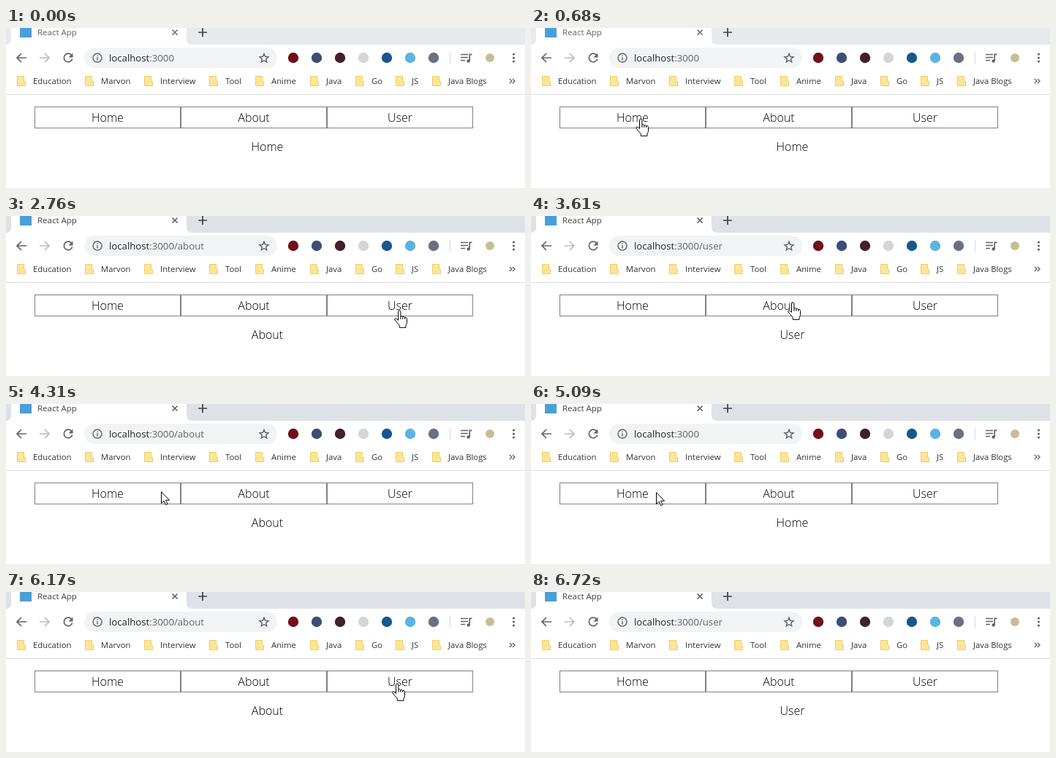
Write an HTML page that moves like this. It is 710 by 220 pixels and loops after 7.04 s.

```html
<!DOCTYPE html>
<html lang="en">
<head>
<meta charset="utf-8">
<title>Router demo</title>
<style>
  html, body { margin: 0; width: 100%; height: 100%; overflow: hidden; background: #fff; }
  svg { display: block; width: 710px; height: 220px; font-family: "Open Sans", "Noto Sans", sans-serif; }
  .strip { fill: #dee1e6; }
  .title { font-size: 11.5px; fill: #3c4043; }
  .close { stroke: #3c4043; }
  .blurred .strip { fill: #e7eaed; }
  .blurred .title { fill: #5f6368; }
  .blurred .close { stroke: #6b6f74; }
  .bookmark { font-size: 11.3px; fill: #2f3336; }
  .folder { fill: #ffe694; stroke: #eccb6b; }
  .url { font-size: 13.2px; fill: #202124; }
  .dim { fill: #5f6368; }
  .icon { fill: none; stroke: #5f6368; stroke-width: 1.7; }
  .thin { stroke-width: 1.4; }
  .dark { stroke: #3c4043; }
  .pale { stroke: #babcbe; }
  .page { font-size: 16px; font-weight: 300; fill: #000; }
  .cell { fill: none; stroke: #808080; }
  .cursor { fill: #fff; stroke: #000; stroke-linejoin: round; }
</style>
</head>
<body>
<svg id="stage" viewBox="0 0 710 220">
  <rect width="710" height="220" fill="#fff"/>

  <!-- tab strip -->
  <path class="strip" d="M0 0H7V15Q7 23 0 23ZM247 0H710V23H255Q247 23 247 15Z"/>
  <rect x="19" width="16" height="13" fill="#4a9fd8"/>
  <text class="title" x="43" y="10">React App</text>
  <path class="icon close" d="M227.5 2.5l7 7m0-7l-7 7"/>
  <path class="icon dark" d="M263 6H275M269 0V12"/>

  <!-- toolbar -->
  <path class="icon" d="M28 41H15.5M21 35l-6 6 6 6"/>
  <path class="icon pale" d="M46 41H58.5M53 35l6 6-6 6"/>
  <path class="icon" d="M89.6 37.2A5.8 5.8 0 1 0 90.7 42.5"/>
  <path d="M91.5 34.5V40.5H85.5Z" fill="#5f6368"/>
  <rect x="107" y="27" width="264" height="28" rx="14" fill="#f1f3f4"/>
  <circle class="icon thin" cx="125" cy="41" r="6"/>
  <path class="icon thin" d="M125 40V44.4M125 37.4V38.8"/>
  <text class="url" x="141" y="46">localhost<tspan class="dim" id="path">:3000</tspan></text>
  <path class="icon thin" d="M353 35.3l1.7 4 4.3.4-3.3 2.8 1 4.3-3.7-2.3-3.7 2.3 1-4.3-3.3-2.8 4.3-.4Z"/>
  <g id="extensions"></g>
  <path d="M607.5 33V49" stroke="#d3d6da"/>
  <path class="icon" d="M622 36.5H632M622 40.5H632M622 44.5H628M634.2 45V36.3H637.5"/>
  <circle cx="632.6" cy="45.4" r="2.2" fill="#5f6368"/>
  <circle cx="662" cy="41" r="6" fill="#c9bd95"/>
  <path d="M694.5 36v10.1" stroke="#5f6368" stroke-width="3.2" stroke-linecap="round" stroke-dasharray="0 5"/>

  <g id="bookmarks"></g>
  <path class="icon thin" d="M689 70l3 3-3 3M693 70l3 3-3 3"/>
  <path d="M0 91.5H710" stroke="#dadce0"/>

  <!-- page -->
  <g id="nav" class="page" text-anchor="middle"></g>
  <text id="content" class="page" x="357.5" y="169" text-anchor="middle">Home</text>

  <circle id="ring" r="12" fill="#ff0" fill-opacity=".47"/>
  <g id="hand" class="cursor">
    <g transform="translate(-1 -.6)">
      <path d="M-.5 14V2.3a1.7 1.7 0 0 1 3.4 0V8.5q2.4-1 2.9.8q2.3-.8 2.8.9q2.9-.6 2.9 1.8v5q0 2-1.5 4v3H1.2V21Q-1.8 17.5-5 13.6q-.9-1.7.6-2.1q1.7-.2 3.9 2.5Z"/>
      <path d="M2.9 8.5V12.5M5.8 9.3V12.5M8.6 10.2V12.5" fill="none"/>
    </g>
  </g>
  <path id="arrow" class="cursor" d="M.5 .7V16.6L4.2 13.2L6.7 18.6L9 17.6L6.6 12.2H11.5Z"/>
</svg>
<script>
const LOOP = 7040, TICK = 76, FOCUS = 760;
const $ = id => document.getElementById(id);

function add(parent, tag, attrs, text = "") {
  const el = document.createElementNS("http://www.w3.org/2000/svg", tag);
  for (const name in attrs) el.setAttribute(name, attrs[name]);
  el.textContent = text;
  return parent.appendChild(el);
}

// Extension badges, evenly spaced.
["#701018", "#3b4f76", "#42202a", "#d3d6d9", "#17578f", "#5ab4e4", "#697080"].forEach((fill, i) =>
  add($("extensions"), "circle", { cx: 393 + 32 * i, cy: 41, r: 7.2, fill }));

// Bookmarks flow from left to right by the width of their labels.
let left = 15;
for (const label of ["Education", "Marvon", "Interview", "Tool", "Anime", "Java", "Go", "JS", "Java Blogs"]) {
  const x = Math.round(left);
  add($("bookmarks"), "path", { class: "folder", d: `M${x + .5} 66.5h9v7h2v6h-11Z` });
  const text = add($("bookmarks"), "text", { class: "bookmark", x: x + 22, y: 77 }, label);
  left += 22 + text.getComputedTextLength() + 18.7;
}

const links = ["Home", "About", "User"].map((label, i) => {
  const x = 139 + 200 * i;
  add($("nav"), "rect", { class: "cell", x: x - 99.5, y: 108.5, width: 199, height: 29 });
  const text = add($("nav"), "text", { x, y: 129 }, label);
  return { x, half: text.getComputedTextLength() / 2 + .5 };
});

// The pointer glides to a place, then presses and releases there to open a page.
const entry = [305, -20];
const visits = [
  { glide: [70, 760], to: [148, 124], bow: 65, click: [830, 990], page: "Home" },
  { glide: [1290, 1530], to: [336, 127], click: [1680, 1830], page: "About" },
  { glide: [2380, 2530], to: [538, 130], click: [2840, 2920], page: "User" },
  { glide: [3150, 3450], to: [358, 119], click: [3760, 3930], page: "About" },
  { glide: [4230, 4460], to: [140, 121], click: [4690, 4860], page: "Home" },
  { glide: [5090, 5480], to: [322, 123], click: [5630, 5780], page: "About" },
  { glide: [5860, 6170], to: [535, 126], click: [6240, 6320], page: "User" },
  { glide: [6490, 6720], to: [640, 228] }
];

const easeOut = p => 1 - (1 - p) ** 2;

// The screen is sampled once per tick, so the pointer moves in steps.
function pointerAt(t) {
  const i = visits.findLastIndex(v => t >= v.glide[0]);
  if (i < 0) return [-50, -50];
  const { glide: [start, end], to, bow = 0 } = visits[i];
  const from = i ? visits[i - 1].to : entry;
  const elapsed = (Math.floor((t - start) / TICK) + .5) * TICK;
  const p = easeOut(Math.min(1, elapsed / (end - start + TICK / 2)));
  const [x, y] = from.map((a, k) => a + (to[k] - a) * p);
  return [Math.round(x), Math.round(y + bow * Math.sin(Math.PI * p))];
}

function setText(el, text) {
  if (el.textContent !== text) el.textContent = text;
}

function show(el, visible, x, y) {
  el.setAttribute("visibility", visible ? "visible" : "hidden");
  el.setAttribute("transform", `translate(${x} ${y})`);
}

function draw(t) {
  const [x, y] = pointerAt(t);
  const overLink = y > 111 && y < 135 && links.some(l => Math.abs(x - l.x) <= l.half);
  const clicks = visits.filter(v => v.click);
  show($("hand"), overLink, x, y);
  show($("arrow"), !overLink, x, y);
  show($("ring"), clicks.some(({ click: [press, release] }) => t >= press && t < release), x, y);

  const page = clicks.findLast(v => t >= v.click[1])?.page ?? "Home";
  setText($("content"), page);
  setText($("path"), ":3000" + (page === "Home" ? "" : "/" + page.toLowerCase()));
  $("stage").classList.toggle("blurred", t < FOCUS);
}

const start = performance.now();
function tick() {
  draw((performance.now() - start) % LOOP);
  requestAnimationFrame(tick);
}
tick();
</script>
</body>
</html>
```
